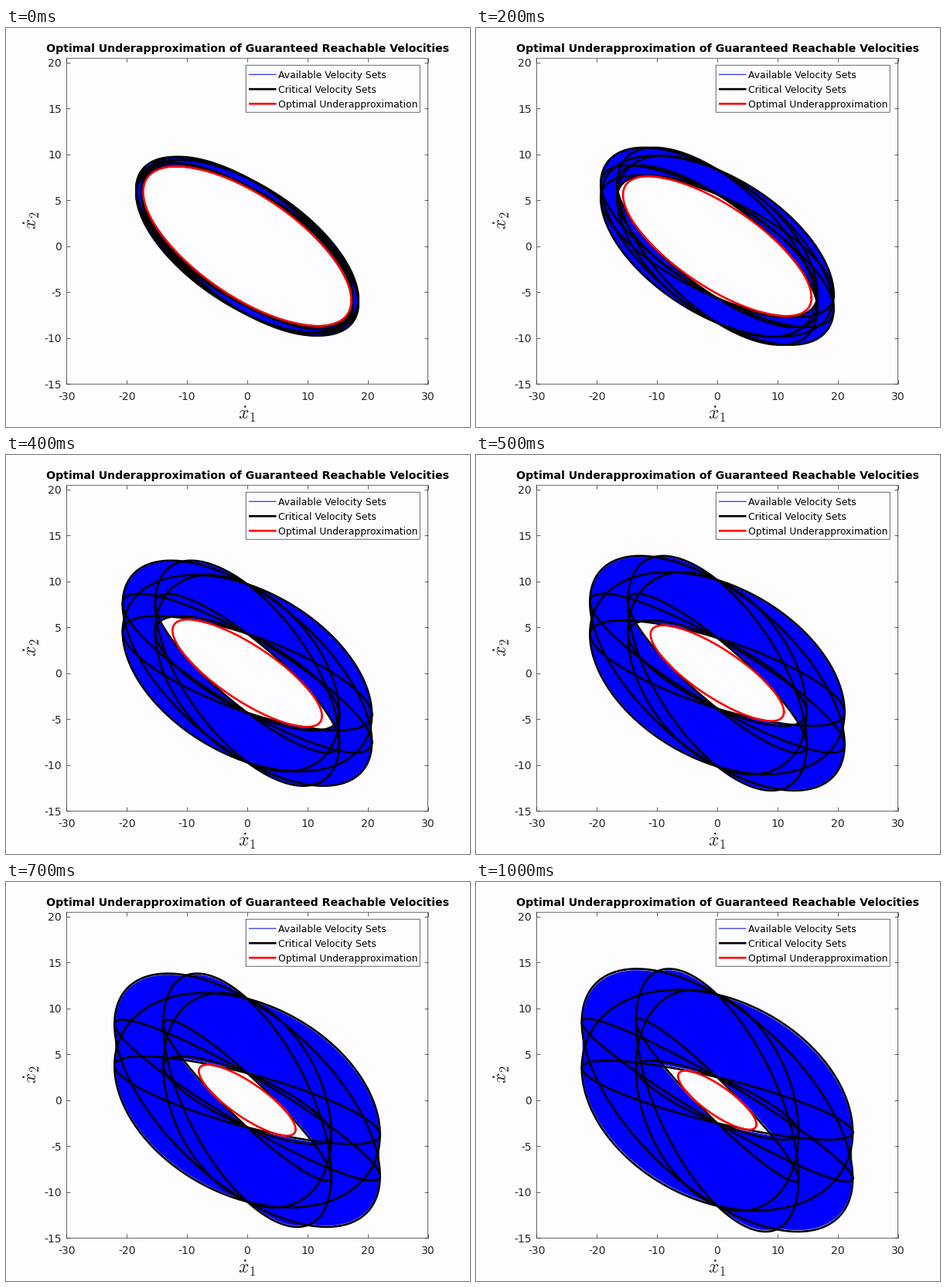
A matplotlib script for the animation above (1.4 s loop, 600 by 517 pixels).

```python
from itertools import product

import matplotlib.pyplot as plt
import numpy as np
from matplotlib.animation import FuncAnimation
from matplotlib.patches import Polygon, Rectangle

W, H, DPI = 600, 517, 100
PX = 72 / DPI
PAPER, INK = "#fdfcff", "#262626"
LEFT, RIGHT, TOP, BOTTOM = 78.4, 545.5, 39.2, 461.3
THICK = 2.67 * PX

plt.rcParams.update({
    "font.family": "DejaVu Sans",
    "mathtext.fontset": "cm",
    "axes.unicode_minus": False,
})

# x1' = a u1, x2' = c u1 + d u2 with |u| <= 1
NOMINAL = np.array([18.0, -6.0, 7.0])
SPREAD = np.array([0.45, 0.25, 0.45])
CORNERS = np.array(list(product((-1, 1), repeat=3)))
LATTICE = np.array(list(product((-1, 1), np.linspace(-1, 1, 25), (-1, 1))))
SAMPLED = 0.965  # part of the uncertainty box that the samples reach

PHI = np.linspace(0, 2 * np.pi, 361)
THETA = np.linspace(0, 2 * np.pi, 1441)


def ellipse(a, c, d):
    return a * np.cos(PHI), c * np.cos(PHI) + d * np.sin(PHI)


def ring(level):
    """Outline of the area swept by all sampled ellipses."""
    a, c, d = (NOMINAL + SAMPLED * level * SPREAD * LATTICE).T[:, :, None]
    x, y = np.cos(THETA), np.sin(THETA)
    r = 1 / np.hypot(x / a, (y - c * x / a) / d)
    outer, inner = r.max(axis=0), r.min(axis=0)[::-1]
    return np.vstack([
        np.column_stack([outer * x, outer * y]),
        np.column_stack([inner * x[::-1], inner * y[::-1]]),
    ])


def inscribed(level):
    """Largest ellipse that fits inside every critical ellipse."""
    sets = NOMINAL + level * SPREAD * CORNERS
    a_min, d_min = sets[:, 0].min(), sets[:, 2].min()
    p = np.linspace(0.3, 0.999, 500)[:, None] * a_min
    slope = np.linspace(-0.47, -0.27, 300)[None, :]
    loss = 0
    for a, c, _ in sets[sets[:, 2] == d_min]:
        beta = p * (slope - c / a) / d_min
        loss = np.maximum(loss, beta ** 2 / (1 - (p / a) ** 2))
    gamma = np.sqrt(np.clip(1 - loss, 0, None))
    i, j = np.unravel_index(np.argmax(p * gamma), gamma.shape)
    return p[i, 0], p[i, 0] * slope[0, j], d_min * gamma[i, j]


fig = plt.figure(figsize=(W / DPI, H / DPI), dpi=DPI, facecolor=PAPER)

ax = fig.add_axes([LEFT / W, 1 - BOTTOM / H, (RIGHT - LEFT) / W,
                   (BOTTOM - TOP) / H], facecolor=PAPER)
ax.set(xlim=(-30, 30), ylim=(-15, 20.46),
       xticks=range(-30, 31, 10), yticks=range(-15, 21, 5))
ax.tick_params(direction="in", top=True, right=True, length=5 * PX,
               width=0.7 * PX, color=INK, labelcolor=INK,
               labelsize=14 * PX)
ax.tick_params(axis="x", pad=10 * PX)
ax.tick_params(axis="y", pad=6.5 * PX)
for spine in ax.spines.values():
    spine.set(linewidth=0.7 * PX, color=INK, snap=False)

area = ax.add_patch(Polygon(np.zeros((3, 2)), facecolor="blue",
                            edgecolor="blue", linewidth=0.6 * PX, zorder=1))
critical = [ax.plot([], [], color="black", lw=THICK, zorder=2)[0]
            for _ in CORNERS]
optimum, = ax.plot([], [], color="red", lw=THICK, zorder=2.2)

# Labels and legend in pixel coordinates
page = fig.add_axes([0, 0, 1, 1])
page.set(xlim=(0, W), ylim=(H, 0))
page.axis("off")


def label(x, y, text, size, **kw):
    kw = {"ha": "center", "va": "center", "color": INK, **kw}
    page.text(x, y, text, fontsize=size * PX, **kw)


label(312, 31.5,
      "Optimal Underapproximation of Guaranteed Reachable Velocities",
      14.07, weight="bold", color="black", va="baseline")
label(311.5, 501, r"$\dot{x}_1$", 23.5)
label(34, 249, r"$\dot{x}_2$", 23.5, rotation=90)

page.add_patch(Rectangle((310.2, 48.2), 225, 61, facecolor=PAPER,
                         edgecolor=INK, linewidth=0.7 * PX, snap=False))
entries = [
    ("Available Velocity Sets", "blue", PX),
    ("Critical Velocity Sets", "black", THICK),
    ("Optimal Underapproximation", "red", THICK),
]
for row, (text, color, width) in enumerate(entries):
    y = 60.2 + 19 * row
    page.plot([314, 349.5], [y, y], color=color, lw=width,
              solid_capstyle="butt", snap=False)
    label(351.5, y + 4.8, text, 12.4, ha="left", va="baseline",
          color="black")


def update(i):
    # the growth skips one level, then rests at the last
    level = min(i + 1 + (i >= 3), 10)
    area.set_xy(ring(level))
    for line, sign in zip(critical, CORNERS):
        line.set_data(*ellipse(*(NOMINAL + level * SPREAD * sign)))
    optimum.set_data(*ellipse(*inscribed(level)))
    return [area, *critical, optimum]


anim = FuncAnimation(fig, update, frames=14, interval=100,
                     repeat=True, repeat_delay=0, blit=False)
plt.show()
```
